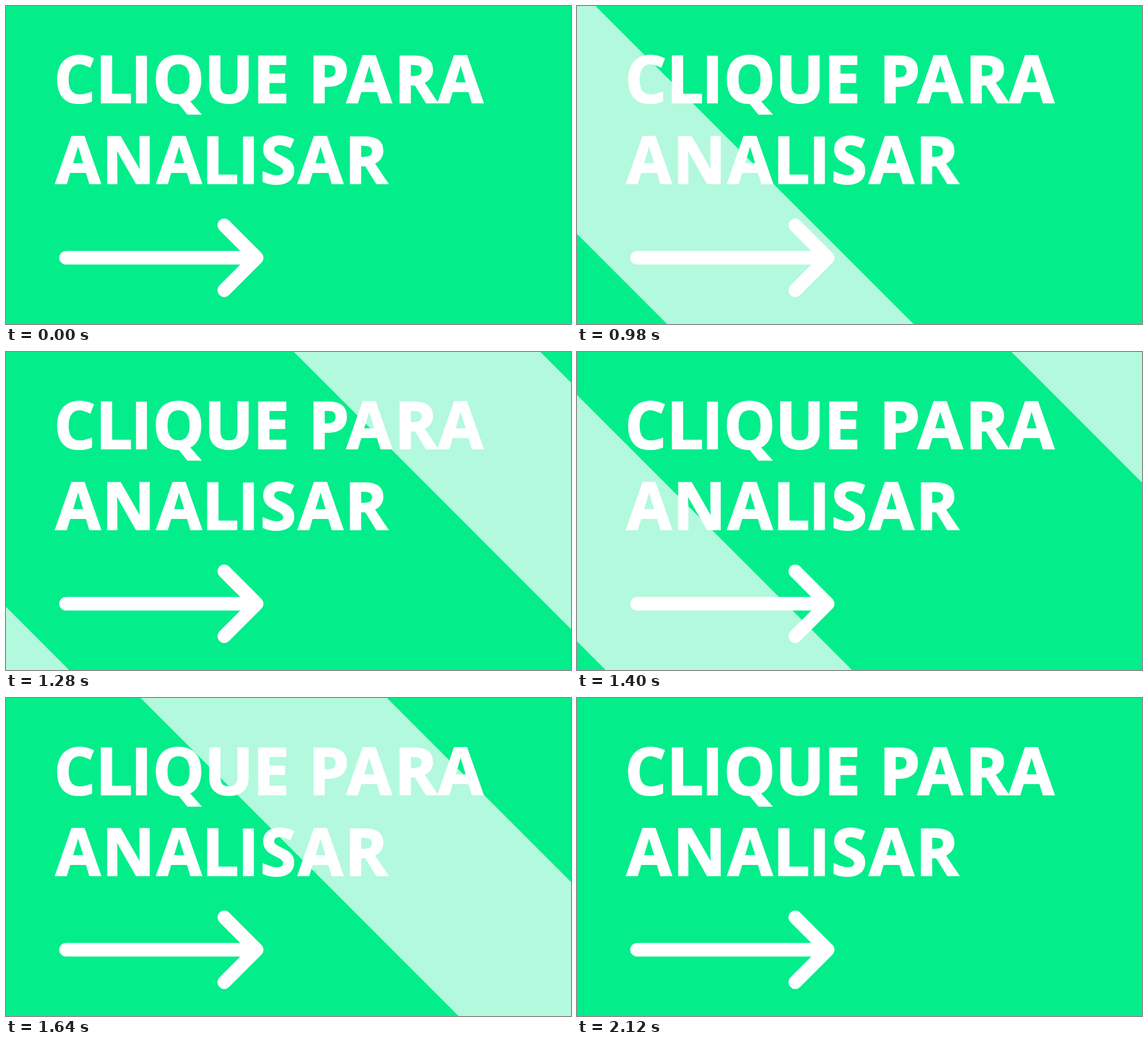
These frames come from a looping animation (853x480 px, 2.32 s). An HTML page with a canvas:

```html
<!DOCTYPE html>
<html lang="pt">
<head>
<meta charset="utf-8">
<title>Clique para analisar</title>
<style>
  html, body { margin: 0; width: 100%; height: 100%; overflow: hidden; background: #04ed8b; }
  canvas { display: block; }
</style>
</head>
<body>
<canvas id="stage" width="853" height="480" role="img" aria-label="Clique para analisar"></canvas>
<script>
const W = 853, H = 480;
const LOOP = 2320, START = 800, END = 2120, STEP = 60;
const BAND = 372;   // horizontal width of a light band
const LAG = 7.58;   // steps between the two bands
const GREEN = '#04ed8b', LIGHT = '#b3f9dd';
const FONT = '700 98px "Open Sans", "Noto Sans", sans-serif';
const PLAIN = '700 96px Inter, "Liberation Sans", sans-serif';   // for an I without serifs
const ctx = document.getElementById('stage').getContext('2d');

// Each letter with the centre of its ink.
const LINES = [
  { base: 145.5, text: 'CLIQUEPARA', at: [104.5, 166, 204.5, 260.5, 336.5, 402, 489.5, 548.5, 623, 686.5] },
  { base: 267.5, text: 'ANALISAR', at: [109, 184.5, 261.5, 326.5, 366, 411.5, 475, 548] }
];

function drawText() {
  ctx.fillStyle = ctx.strokeStyle = '#fff';
  ctx.lineWidth = 2.2;
  ctx.lineJoin = 'miter';
  ctx.miterLimit = 3;
  for (const { base, text, at } of LINES) {
    [...text].forEach((ch, i) => {
      ctx.font = ch === 'I' ? PLAIN : FONT;
      const m = ctx.measureText(ch);
      const x = at[i] - (m.actualBoundingBoxRight - m.actualBoundingBoxLeft) / 2;
      ctx.fillText(ch, x, base);
      ctx.strokeText(ch, x, base);
    });
  }
}

function drawArrow() {
  ctx.strokeStyle = '#fff';
  ctx.lineWidth = 20.5;
  ctx.lineCap = ctx.lineJoin = 'round';
  ctx.beginPath();
  ctx.moveTo(90.5, 380);
  ctx.lineTo(378, 380);
  ctx.moveTo(329.5, 331);
  ctx.lineTo(378.5, 380);
  ctx.lineTo(329.5, 429);
  ctx.stroke();
}

// Leading edge at the top of the stage: steady speed, then a smooth stop.
function leadAt(s) {
  const speed = 160, brake = 6.552, drag = 10.09;
  const u = Math.min(Math.max(s - brake, 0), speed / (2 * drag));
  return -452 + speed * (Math.min(s, brake) + u) - drag * u * u;
}

function drawBand(lead) {
  ctx.fillStyle = LIGHT;
  ctx.beginPath();
  ctx.moveTo(lead - BAND, 0);
  ctx.lineTo(lead, 0);
  ctx.lineTo(lead + H, H);
  ctx.lineTo(lead + H - BAND, H);
  ctx.fill();
}

function draw(t) {
  ctx.fillStyle = GREEN;
  ctx.fillRect(0, 0, W, H);
  if (t >= START && t < END) {
    const s = Math.floor((t - START) / STEP);
    drawBand(leadAt(s));
    drawBand(leadAt(s - LAG));
  }
  drawText();
  drawArrow();
}

const t0 = performance.now();
function tick() {
  draw((performance.now() - t0) % LOOP);
  requestAnimationFrame(tick);
}
tick();
</script>
</body>
</html>
```
